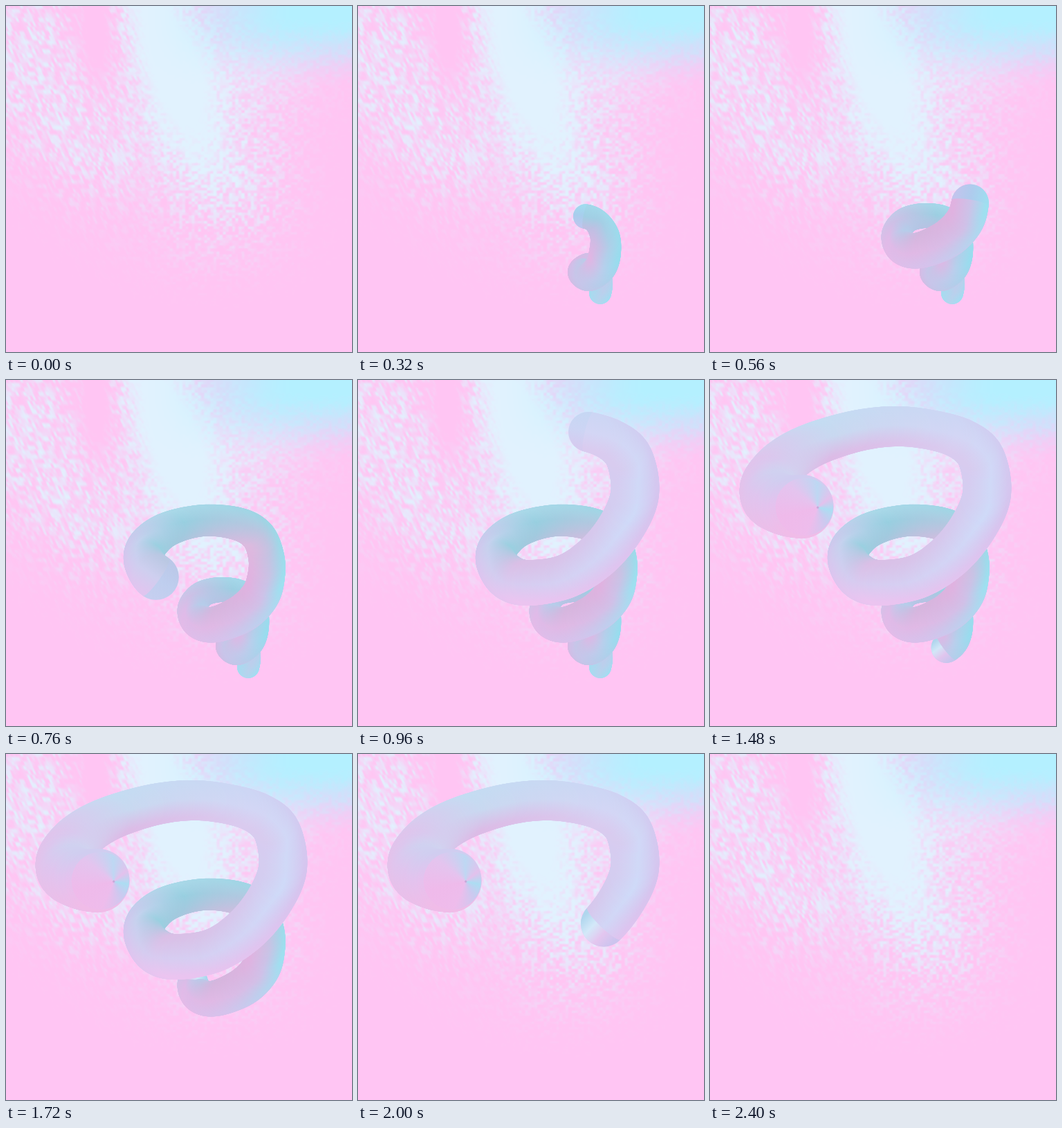
These frames come from a looping animation (500 by 500 pixels, 2.44 s). An HTML page with a canvas:

```html
<!DOCTYPE html>
<html lang="en">
<head>
<meta charset="utf-8">
<title>Spiral tube</title>
<style>
html, body { margin: 0; width: 100%; height: 100%; overflow: hidden; background: #fec6f3; }
canvas { display: block; }
</style>
</head>
<body>
<canvas width="500" height="500"></canvas>
<script>
const ctx = document.querySelector('canvas').getContext('2d');
const LOOP = 2440, FRAME = 40, STEP = 0.03;

const clamp = v => Math.max(0, Math.min(1, v));
const mix = (a, b, k) => a + (b - a) * k;
const mixAll = (a, b, k) => a.map((v, i) => mix(v, b[i], k));
const smooth = v => { v = clamp(v); return v * v * (3 - 2 * v); };
const rgb = hex => [1, 3, 5].map(i => parseInt(hex.slice(i, i + 2), 16));

// Centre line of the tube from the bottom tip upwards: x, y, radius
const PATH = [
  [350, 415, 16], [352, 400, 16], [347, 382, 16], [334, 374, 17], [323, 384, 20],
  [334, 391, 21], [350, 378, 23], [357, 356, 23], [356, 330, 21], [340, 308, 18],
  [311, 303, 18], [283, 310, 19], [270, 330, 22], [279, 349, 25], [303, 353, 26],
  [342, 337, 28], [367, 312, 28], [376, 284, 27], [376, 255, 26], [364, 225, 25],
  [335, 208, 24], [285, 203, 23], [235, 215, 25], [206, 237, 28], [199, 260, 29],
  [217, 285, 33], [247, 293, 33], [300, 284, 32], [345, 255, 33], [380, 213, 34],
  [400, 165, 35], [393, 115, 34], [371, 90, 31], [333, 75, 29], [275, 67, 29],
  [215, 73, 30], [150, 93, 32], [108, 118, 35], [84, 148, 38], [87, 170, 42],
  [110, 181, 44], [133, 183, 46]
];
const LAST = PATH.length - 1;

// Path position, then colours at the outer edge, middle and inner edge
const SHADES = [
  [0, '#9fdff2', '#b2d6ee', '#a5dcf0'],
  [4, '#dcb8e4', '#d3bee8', '#b5d0ea'],
  [7, '#98dcee', '#b8cfec', '#e0b6e4'],
  [10, '#a5d6e8', '#9ccfe2', '#b5c2e2'],
  [13, '#e4bae8', '#dfbbe8', '#b6cdea'],
  [14.5, '#d4c3ec', '#e0b9e5', '#d5b6de'],
  [17, '#9ee0f0', '#cdc2e8', '#e0b2e0'],
  [19.5, '#9fd4e4', '#c0c4e0', '#dcbadf'],
  [22, '#a9d8e8', '#98cfe0', '#a4c8de'],
  [24, '#d4c6ee', '#c4d2ee', '#9ad0e0'],
  [26, '#ecc4f0', '#d8cbf0', '#dabfe6'],
  [30, '#d6c4ee', '#cfdaf8', '#d4cdf0'],
  [33, '#cdd6f4', '#d3d6f5', '#dacbef'],
  [36, '#c4dcf2', '#c9d8f0', '#dcbbe6'],
  [38, '#e0c4ec', '#d9c9ee', '#d0d4f0'],
  [41, '#f0bce8', '#e4c2ee', '#d0cdf0']
];

// Time in ms and path position of the growing and the vanishing end
const HEAD = [[20, 0], [560, 17], [960, 33], [1120, 36.8], [1240, 39], [1360, LAST]];
const TAIL = [[1280, 0], [1720, 12], [2000, 28.25], [2240, 36], [2400, LAST]];

function track(keys, t) {
  if (t <= keys[0][0]) return keys[0][1];
  const i = keys.findIndex(k => k[0] >= t);
  if (i < 0) return keys[keys.length - 1][1];
  const [a, b] = [keys[i - 1], keys[i]];
  return mix(a[1], b[1], (t - a[0]) / (b[0] - a[0]));
}

function pointAt(u) {
  const i = Math.min(LAST - 1, Math.floor(u)), k = u - i;
  const p = [-1, 0, 1, 2].map(d => PATH[Math.max(0, Math.min(LAST, i + d))]);
  return [0, 1, 2].map(c => {
    const [a, b, e, f] = p.map(q => q[c]);
    return b + k / 2 * (e - a + k * (2 * a - 5 * b + 4 * e - f + k * (3 * (b - e) + f - a)));
  });
}

function shadesAt(u) {
  const i = Math.max(1, SHADES.findIndex(s => s[0] >= u));
  const [a, b] = [SHADES[i - 1], SHADES[i]];
  const k = (u - a[0]) / (b[0] - a[0]);
  return [1, 2, 3].map(c => `rgb(${mixAll(rgb(a[c]), rgb(b[c]), k).map(Math.round)})`);
}

function acrossGradient({ x, y, r, dx, dy }, colors) {
  const g = ctx.createLinearGradient(x - dy * r, y + dx * r, x + dy * r, y - dx * r);
  colors.forEach((c, i) => g.addColorStop(0.08 + 0.84 * i / (colors.length - 1), c));
  return g;
}

const rings = [];
for (let i = 0; i * STEP <= LAST; i++) {
  const u = i * STEP, [x, y, r] = pointAt(u);
  const a = pointAt(Math.max(0, u - 0.05)), b = pointAt(Math.min(LAST, u + 0.05));
  const len = Math.hypot(b[0] - a[0], b[1] - a[1]);
  const ring = { u, x, y, r, dx: (b[0] - a[0]) / len, dy: (b[1] - a[1]) / len };
  ring.fill = acrossGradient(ring, shadesAt(u));
  rings.push(ring);
}

function disc(x, y, r, fill) {
  ctx.fillStyle = fill;
  ctx.beginPath();
  ctx.arc(x, y, r, 0, 7);
  ctx.fill();
}

// Rounded end seen from the side; side is 1 for the head, -1 for the tail
function sideCap(ring, side, colors, alpha) {
  const { x, y, r, dx, dy } = ring;
  ctx.save();
  ctx.translate(x, y);
  ctx.rotate(Math.atan2(dy * side, dx * side));
  ctx.beginPath();
  ctx.arc(0, 0, r, -Math.PI / 2, Math.PI / 2);
  ctx.ellipse(0, 0, r * 0.18, r, 0, Math.PI / 2, -Math.PI / 2, true);
  ctx.setTransform(1, 0, 0, 1, 0, 0);
  ctx.globalAlpha = alpha;
  ctx.fillStyle = acrossGradient(ring, colors);
  ctx.fill();
  ctx.restore();
}

function faceCap({ x, y, r, dx, dy }, alpha) {
  const cx = x + dx * r * 0.5, cy = y + dy * r * 0.4;
  const g = ctx.createConicGradient(0.2, cx, cy);
  ['#a2e2f3', '#c6cbf0', '#eebcec', '#f0b9ea', '#e6c3ee', '#b9daf3', '#e4c0ec', '#a2e2f3']
    .forEach((c, i) => g.addColorStop(i / 7, c));
  ctx.globalAlpha = alpha;
  disc(x + dx * r * 0.08, y + dy * r * 0.08, r * 0.91, g);
  disc(cx, cy, 1.6, '#c3a5d6');
  ctx.globalAlpha = 1;
}

function drawTube(tail, head) {
  const first = Math.ceil(tail / STEP), last = Math.min(rings.length - 1, Math.floor(head / STEP));
  if (last <= first) return;
  const start = rings[first], end = rings[last];
  let capped = tail === 0;
  for (let i = first; i <= last; i++) {
    const q = rings[i];
    disc(q.x, q.y, q.r, q.fill);
    if (!capped && (i === last || Math.hypot(q.x - start.x, q.y - start.y) > start.r)) {
      sideCap(start, -1, ['#c9c4ee', '#e6c4ee', '#d3edfa', '#a9d9ee'], 0.85);
      capped = true;
    }
  }
  const facing = smooth((end.u - 36) / 2.5);
  if (facing < 1) {
    const fade = 1 - smooth((end.u - 18) / 12);
    sideCap(end, 1, ['#a0dcf0', '#a9cdee', '#bcc8f0'], (1 - facing) * mix(0.15, 0.85, fade));
  }
  if (facing > 0) faceCap(end, facing * 0.85);
}

function hash(x, y) {
  let h = Math.imul(x, 374761393) + Math.imul(y, 668265263);
  h = Math.imul(h ^ (h >>> 13), 1274126177);
  return ((h ^ (h >>> 16)) >>> 0) / 4294967296;
}

function noise(x, y) {
  const i = Math.floor(x), j = Math.floor(y), a = smooth(x - i), b = smooth(y - j);
  return mix(mix(hash(i, j), hash(i + 1, j), a), mix(hash(i, j + 1), hash(i + 1, j + 1), a), b);
}

// Pink sheet with a rippled pale glow and a cyan corner
function makeBackground() {
  const sheet = document.createElement('canvas');
  sheet.width = sheet.height = 500;
  const c = sheet.getContext('2d'), img = c.createImageData(500, 500);
  const pink = [255, 197, 243], pale = [225, 242, 254], cyan = [180, 240, 255];
  for (let y = 0; y < 500; y++) for (let x = 0; x < 500; x++) {
    const glow = (cx, cy, sx, sy) => Math.exp(-(((x - cx) / sx) ** 2) - ((y - cy) / sy) ** 2);
    const ridge = Math.exp(-(((x - 212 - y * 0.3) / 58) ** 2)) * (1 - smooth((y - 60) / 290));
    const light = 0.95 * ridge + 0.5 * glow(30, 70, 95, 130) + 0.42 * glow(140, 200, 100, 95)
      + 0.42 * glow(325, 240, 100, 95) + 0.5 * glow(350, 80, 120, 80)
      + 0.12 * glow(280, 350, 150, 70) - 0.32 * glow(130, 40, 24, 85);
    const slanted = noise((x - y * 0.45) / 3.6, y / 6.5), round = noise(x / 4.5 + 90, y / 4);
    const ripple = mix(slanted, round, smooth((x - 130) / 140)) - 0.5;
    const rough = 4 * clamp(light) * (1 - clamp(light)) * mix(1, 0.3, glow(410, 70, 130, 80));
    const m = smooth(light + ripple * rough * 0.8);
    const corner = smooth((x - 190) / 230) * smooth(1.15 - y / 105 + ripple * 0.12);
    const color = mixAll(mixAll(pink, pale, m), cyan, corner);
    img.data.set([...color, 255], (y * 500 + x) * 4);
  }
  c.putImageData(img, 0, 0);
  return sheet;
}

const background = makeBackground();

function draw() {
  const t = Math.floor(performance.now() % LOOP / FRAME) * FRAME;
  ctx.drawImage(background, 0, 0);
  drawTube(track(TAIL, t), track(HEAD, t));
  requestAnimationFrame(draw);
}
draw();
</script>
</body>
</html>
```
